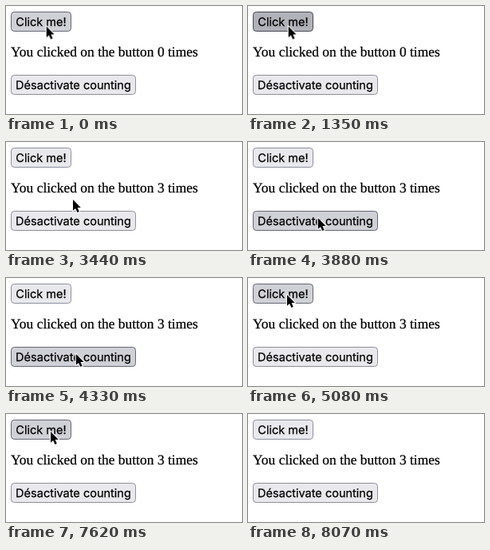
Write an HTML page that moves like this. It is 296 px wide and 135 px high and loops after 8.37 s.

```html
<!DOCTYPE html>
<html lang="en">
<head>
<meta charset="utf-8">
<title>Click counter</title>
<style>
  html, body { margin: 0; width: 100%; height: 100%; overflow: hidden; background: #fff; }
  svg { display: block; width: 100vw; height: 100vh; }

  svg {
    --idle: #e9e9ed; --idle-line: #8f8f9d;
    --hover: #d0d0d7; --hover-line: #676774;
    --down: #b1b1b9; --down-line: #484851;
  }
  text { stroke: #000; stroke-width: .25; text-rendering: geometricPrecision; }
  .label { font: 14.54px Inter, "Open Sans", sans-serif; }
  .line { font: 17.44px "Liberation Serif", "Times New Roman", serif; font-kerning: normal; }
  .button { fill: var(--idle); stroke: var(--idle-line); stroke-width: 1; }
  .pointer path { stroke-linejoin: round; }

  .button, .count, .pointer { animation: 8370ms step-end infinite; }
  #click { animation-name: click; }
  #toggle { animation-name: toggle; }
  .pointer { animation-name: travel; }
  .count { visibility: hidden; }
  #n0 { animation-name: zero; }
  #n1 { animation-name: one; }
  #n2 { animation-name: two; }
  #n3 { animation-name: three; }

  @keyframes click {
    0%, 17.921%, 24.97%, 33.93%, 58.9%, 75.029%, 83.87% { fill: var(--hover); stroke: var(--hover-line); }
    16.129%, 23.297%, 32.138%, 73.237%, 82.198% { fill: var(--down); stroke: var(--down-line); }
    39.307%, 92.831%, 100% { fill: var(--idle); stroke: var(--idle-line); }
  }
  @keyframes toggle {
    0%, 55.316%, 100% { fill: var(--idle); stroke: var(--idle-line); }
    42.891%, 51.732% { fill: var(--hover); stroke: var(--hover-line); }
    49.94% { fill: var(--down); stroke: var(--down-line); }
  }

  @keyframes zero {
    0% { visibility: visible; }
    17.921%, 100% { visibility: hidden; }
  }
  @keyframes one {
    0%, 24.97%, 100% { visibility: hidden; }
    17.921% { visibility: visible; }
  }
  @keyframes two {
    0%, 33.93%, 100% { visibility: hidden; }
    24.97% { visibility: visible; }
  }
  @keyframes three {
    0% { visibility: hidden; }
    33.93%, 100% { visibility: visible; }
  }

  @keyframes travel {
    0% { transform: translate(50.7px, 25.5px); visibility: visible; }
    39.307% { transform: translate(62px, 42px); }
    41.099% { transform: translate(84px, 72px); }
    42.891% { transform: translate(87px, 89px); }
    44.683% { transform: translate(88px, 95px); }
    46.355% { transform: translate(87.8px, 95px); }
    55.316% { transform: translate(81px, 76px); }
    57.108% { transform: translate(60px, 39px); }
    58.9% { transform: translate(50px, 23px); }
    60.692% { transform: translate(49px, 21px); }
    78.614% { transform: translate(50px, 20px); }
    80.406% { transform: translate(50.8px, 18.7px); }
    91.039% { transform: translate(56px, 22px); }
    92.831% { transform: translate(112px, 63px); }
    94.623% { transform: translate(213px, 120px); visibility: visible; }
    96.415%, 100% { transform: translate(213px, 140px); visibility: hidden; }
  }
</style>
</head>
<body>
<svg viewBox="0 0 296 135">
  <rect id="click" class="button" x="6.5" y="7.5" width="75" height="24" rx="3.8"/>
  <text class="label" x="44" y="24.8" text-anchor="middle">Click me!</text>

  <g class="line">
    <text x="6" y="63">You clicked on the button</text>
    <text id="n0" class="count" x="189.9" y="63">0</text>
    <text id="n1" class="count" x="189.9" y="63">1</text>
    <text id="n2" class="count" x="189.9" y="63">2</text>
    <text id="n3" class="count" x="189.9" y="63">3</text>
    <text x="203" y="63">times</text>
  </g>

  <rect id="toggle" class="button" x="6.5" y="86.5" width="156" height="24" rx="3.8"/>
  <text class="label" x="84.5" y="103.8" text-anchor="middle">Désactivate counting</text>

  <g class="pointer">
    <path d="M0 0V13.8L3.1 10.9L5.4 16.1L7.8 15.1L5.6 10H9.8Z" fill="#000" stroke="#fff" stroke-width="2.2" paint-order="stroke"/>
  </g>
</svg>
</body>
</html>
```
